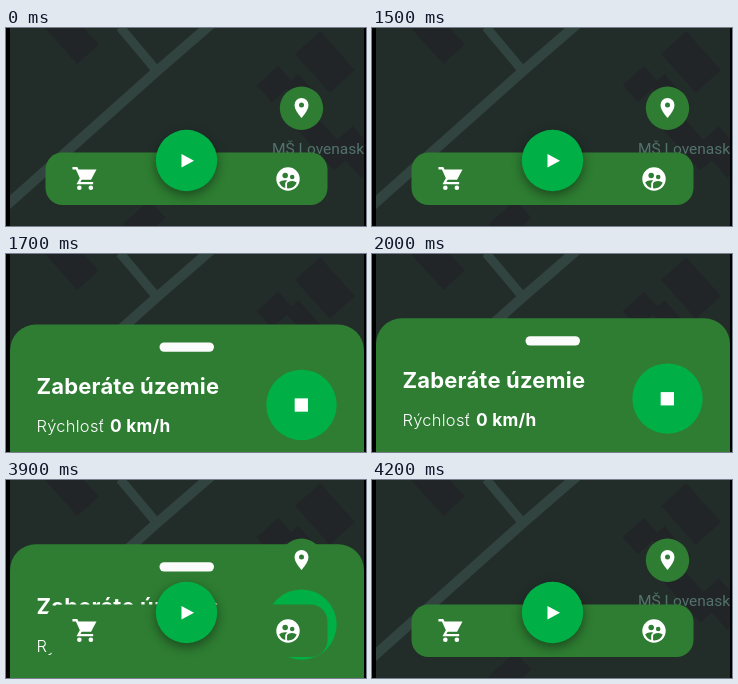
An HTML page with a canvas that plays this animation: 360 by 198 pixels, repeating every 4.8 s.

```html
<!DOCTYPE html>
<html lang="sk">
<head>
<meta charset="utf-8">
<title>Map sheet</title>
<style>
html, body { margin: 0; width: 100%; height: 100%; overflow: hidden; background: #000; }
canvas { display: block; width: 360px; height: 198px; }
</style>
</head>
<body>
<canvas id="stage" width="360" height="198"></canvas>
<script>
const ctx = document.getElementById('stage').getContext('2d');
const LOOP = 4800, TICK = 100;
const OPEN = { start: 1581.7, length: 185 };
const CLOSE = { start: 3900, length: 230 };
const SHEET_TOP = 64.2, BOTTOM = 198;
const GREEN = '#2e7d32', BRIGHT = '#00b047', WHITE = '#fff';
const STREET_ANGLE = 48 * Math.PI / 180;

function within(x, y, scale, paint) {
  ctx.save();
  ctx.translate(x, y);
  ctx.scale(scale, scale);
  paint();
  ctx.restore();
}

function disc(x, y, r, color) {
  ctx.fillStyle = color;
  ctx.beginPath();
  ctx.arc(x, y, r, 0, Math.PI * 2);
  ctx.fill();
}

function box(x, y, w, h, r, color) {
  ctx.fillStyle = color;
  ctx.beginPath();
  ctx.roundRect(x, y, w, h, r);
  ctx.fill();
}

function stroke(width, color, ...points) {
  ctx.lineWidth = width;
  ctx.strokeStyle = color;
  ctx.beginPath();
  for (const [x, y] of points) ctx.lineTo(x, y);
  ctx.stroke();
}

function fill(color, ...points) {
  ctx.fillStyle = color;
  ctx.beginPath();
  for (const [x, y] of points) ctx.lineTo(x, y);
  ctx.fill();
}

function text(str, x, y, font, color, spacing = 0) {
  ctx.font = font;
  ctx.letterSpacing = spacing + 'px';
  ctx.fillStyle = color;
  ctx.fillText(str, x, y);
}

// A house: a rectangle turned to face the street.
function house(x, y, length, depth) {
  ctx.save();
  ctx.translate(x, y);
  ctx.rotate(STREET_ANGLE);
  ctx.fillStyle = '#222528';
  ctx.fillRect(-length / 2, -depth / 2, length, depth);
  ctx.restore();
}

function drawMap() {
  ctx.fillStyle = '#222d2a';
  ctx.fillRect(4, 0, 354, 198);
  house(62, 4, 60, 29);
  house(319, 34, 52, 34);
  house(269, 56, 23, 29);
  house(299, 67, 40, 18);
  house(316, 112, 62, 23);
  house(351, 124, 44, 28);
  house(156, 147, 29, 36);
  house(80, 152, 11, 22);
  house(138, 193, 24, 36);
  stroke(9, '#32443f', [114, -1], [150, 42]);
  stroke(10, '#32443f', [-8, 185], [151, 43], [211, -9]);
  text('MŠ Lovenask', 266, 126, '15.5px Roboto, sans-serif', '#52736a');
  text('UNI', 68, 166, '11.5px Roboto, sans-serif', '#8c9a96');
}

function drawSheet(top) {
  within(0, top, 1, () => {
    box(4, 0, 354, 170, [26, 26, 0, 0], GREEN);
    box(153.5, 18, 54.5, 9.3, 4.65, '#fbfbfb');
    text('Zaberáte územie', 30.5, 69.3, '700 22px Inter, sans-serif', WHITE, 0.18);
    text('Rýchlosť', 30.5, 108, '300 16.5px Inter, sans-serif', WHITE, 0.25);
    text('0 km/h', 104, 108, '700 17.3px Inter, sans-serif', WHITE, 0.25);
    disc(295.5, 80.4, 35.2, BRIGHT);
    ctx.fillStyle = WHITE;
    ctx.fillRect(288.7, 73.9, 13.3, 13.3);
  });
}

function pinIcon() {
  ctx.fillStyle = WHITE;
  ctx.beginPath();
  ctx.arc(0, 0, 7, Math.PI, 0);
  ctx.quadraticCurveTo(7, 5, 0, 13);
  ctx.quadraticCurveTo(-7, 5, -7, 0);
  ctx.fill();
  disc(0, 0, 2.5, GREEN);
}

function cartIcon() {
  stroke(2, WHITE, [1, 3], [4.6, 3], [8.6, 11.6], [6.2, 16], [19, 16]);
  fill(WHITE, [5, 4], [21.9, 4], [17.2, 13], [8.2, 13]);
  disc(7, 20, 2, WHITE);
  disc(17, 20, 2, WHITE);
}

function peopleIcon() {
  disc(0, 0, 10, WHITE);
  disc(-2.4, -2.9, 2.36, GREEN);
  disc(3.6, -1.7, 1.93, GREEN);
  ctx.beginPath();
  ctx.arc(0, 0, 8, 1.87, 2.8);
  ctx.quadraticCurveTo(-5, 0.6, -0.5, 1.2);
  ctx.quadraticCurveTo(-2.4, 2.3, -2.4, 3.9);
  ctx.fill();
  ctx.beginPath();
  ctx.arc(0, 0, 8, 0.37, 1.67);
  ctx.lineTo(-0.8, 3.9);
  ctx.quadraticCurveTo(-0.3, 2, 3.6, 1.8);
  ctx.quadraticCurveTo(6, 1.9, 7.4, 2.9);
  ctx.fill();
}

function drawControls() {
  disc(295.5, 80.2, 21.7, GREEN);
  within(295.5, 77, 1, pinIcon);
  box(39.5, 124.5, 282, 52.5, 17, GREEN);
  within(65.3, 136.8, 1.15, cartIcon);
  within(282, 151, 1.17, peopleIcon);

  ctx.save();
  ctx.shadowColor = 'rgba(0,0,0,.42)';
  ctx.shadowBlur = 11;
  ctx.shadowOffsetY = 4;
  disc(180.5, 132.5, 30.7, BRIGHT);
  ctx.restore();
  fill(WHITE, [175.5, 126], [188, 132.7], [175.5, 139.5]);
}

const progress = (t, span) => Math.min(1, Math.max(0, (t - span.start) / span.length));

function sheetTop(t) {
  const hidden = t < CLOSE.start
    ? (1 - progress(t, OPEN)) ** 3
    : progress(t, CLOSE) ** 3;
  return SHEET_TOP + (BOTTOM - SHEET_TOP) * hidden;
}

function draw(t) {
  ctx.fillStyle = '#000';
  ctx.fillRect(0, 0, 360, 198);
  ctx.save();
  ctx.beginPath();
  ctx.rect(4, 0, 354, 198);
  ctx.clip();
  drawMap();
  const top = sheetTop(t);
  if (top < BOTTOM) drawSheet(top);
  if (t < OPEN.start || t >= CLOSE.start) drawControls();
  ctx.restore();
}

const begin = performance.now();
function frame() {
  const t = (performance.now() - begin) % LOOP;
  draw(Math.floor(t / TICK) * TICK);
  requestAnimationFrame(frame);
}
frame();
</script>
</body>
</html>
```
